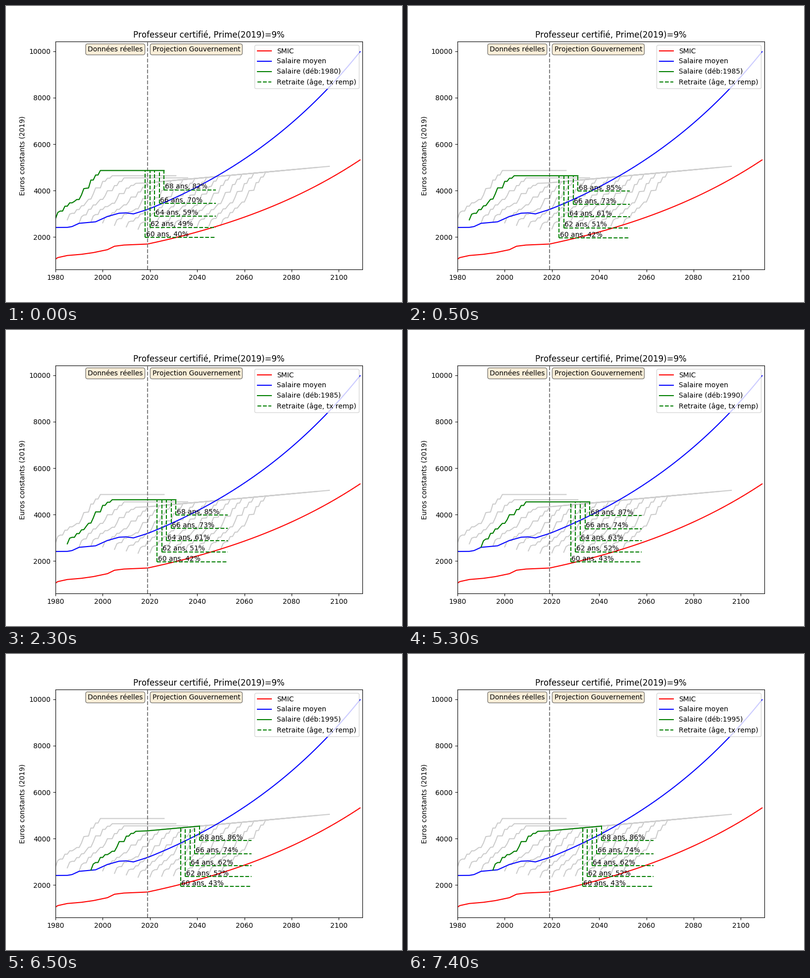
Animation of 800 by 600 pixels, one loop 8000 ms. Source, as a matplotlib script:

```python
import numpy as np
import matplotlib.pyplot as plt
from matplotlib.animation import FuncAnimation

plt.rcParams["text.kerning_factor"] = 6

WAGE_GROWTH = 1.01277   # projected yearly growth after 2019
POINT_VALUE = .01422    # pension bought by one year at the mean wage
FULL_AGE = 65           # 5% less or more per year before or after
CAREER = 46             # years from hiring at 22 to age 68
AGES = range(60, 70, 2)

# (year, euros) turning points
SMIC = [(1980, 1050), (1981, 1114), (1985, 1203), (1991, 1255), (1996, 1327),
        (2002, 1454), (2005, 1603), (2009, 1654), (2014, 1675), (2019, 1698)]
MEAN = [(1980, 2411), (1985, 2415), (1987, 2450), (1990, 2590), (1997, 2655),
        (2002, 2885), (2007, 3027), (2010, 3040), (2013, 2995), (2019, 3186)]
FIRST_PAY = [(1980, 2793), (1985, 2740), (1990, 2602), (1995, 2644),
             (1999, 2634), (2004, 2512), (2009, 2462), (2014, 2335),
             (2019, 2347), (2096, 2732)]

# (years of service, multiple of first pay) for each promotion
LADDER = [(0, 1), (1, 1.1), (2, 1.125), (4, 1.21), (6, 1.28), (8, 1.33),
          (9, 1.375), (11, 1.46), (12, 1.56), (15, 1.685), (17, 1.77),
          (19, 1.847)]


def follow(points, years):
    return np.interp(years, *zip(*points))


def wage(points, years):
    growth = WAGE_GROWTH ** np.maximum(years - 2019, 0)
    return follow(points, years) * growth


def career(start):
    service = np.arange(CAREER + 1)
    years = start + service
    steps, levels = map(np.array, zip(*LADDER))
    level = levels[np.searchsorted(steps, service, side="right") - 1]
    # Pay never goes down
    return years, np.maximum.accumulate(level * follow(FIRST_PAY, years))


def pension(years, pay, age):
    k = age - 22
    mean = wage(MEAN, years)
    points = np.sum(pay[:k] / mean[:k])
    return POINT_VALUE * points * mean[k] * (1 + .05 * (age - FULL_AGE))


fig, ax = plt.subplots(figsize=(8, 6), dpi=100)
fig.subplots_adjust(left=.125, right=.9, bottom=.11, top=.88)
ax.set_xlim(1980, 2110)
ax.set_ylim(603, 10422)
ax.set_title("Professeur certifié, Prime(2019)=9%")
ax.set_ylabel("Euros constants (2019)")

for start in range(1980, 2055, 5):
    ax.plot(*career(start), color="0.8")

span = np.arange(1980, 2110)
ax.plot(span, wage(SMIC, span), color="red", label="SMIC")
ax.plot(span, wage(MEAN, span), color="blue", label="Salaire moyen")
ax.axvline(2019, color="grey", linestyle="--")

box = dict(boxstyle="round", facecolor="wheat", alpha=.5)
ax.text(2017, 10000, "Données réelles", ha="right", bbox=box)
ax.text(2021, 10000, "Projection Gouvernement", ha="left", bbox=box)

pay_line, = ax.plot([], [], color="green", label="Salaire (déb:1980)")
pension_lines = [ax.plot([], [], color="green", linestyle="--")[0]
                 for _ in AGES]
pension_lines[0].set_label("Retraite (âge, tx remp)")
notes = [ax.text(0, 0, "") for _ in AGES]
legend = ax.legend(loc="upper right")


def hiring_year(frame):
    # Half a second on the first career, then three seconds each
    return 1980 + 5 * ((frame + 5) // 6)


def update(frame):
    start = hiring_year(frame)
    years, pay = career(start)
    pay_line.set_data(years, pay)
    legend.get_texts()[2].set_text(f"Salaire (déb:{start})")
    for age, line, note in zip(AGES, pension_lines, notes):
        year, last_pay = start + age - 22, pay[age - 22]
        amount = pension(years, pay, age)
        # Two dashed strokes, both starting at the corner
        line.set_data([year, year, np.nan, year, start + 68],
                      [amount, last_pay, np.nan, amount, amount])
        note.set_position((year + .3, amount + 50))
        note.set_text(f"{age} ans, {int(100 * amount / last_pay)}%")
    return [pay_line, *pension_lines, *notes]


anim = FuncAnimation(fig, update, frames=16, interval=500,
                     repeat=True, repeat_delay=0, blit=False)
plt.show()
```
